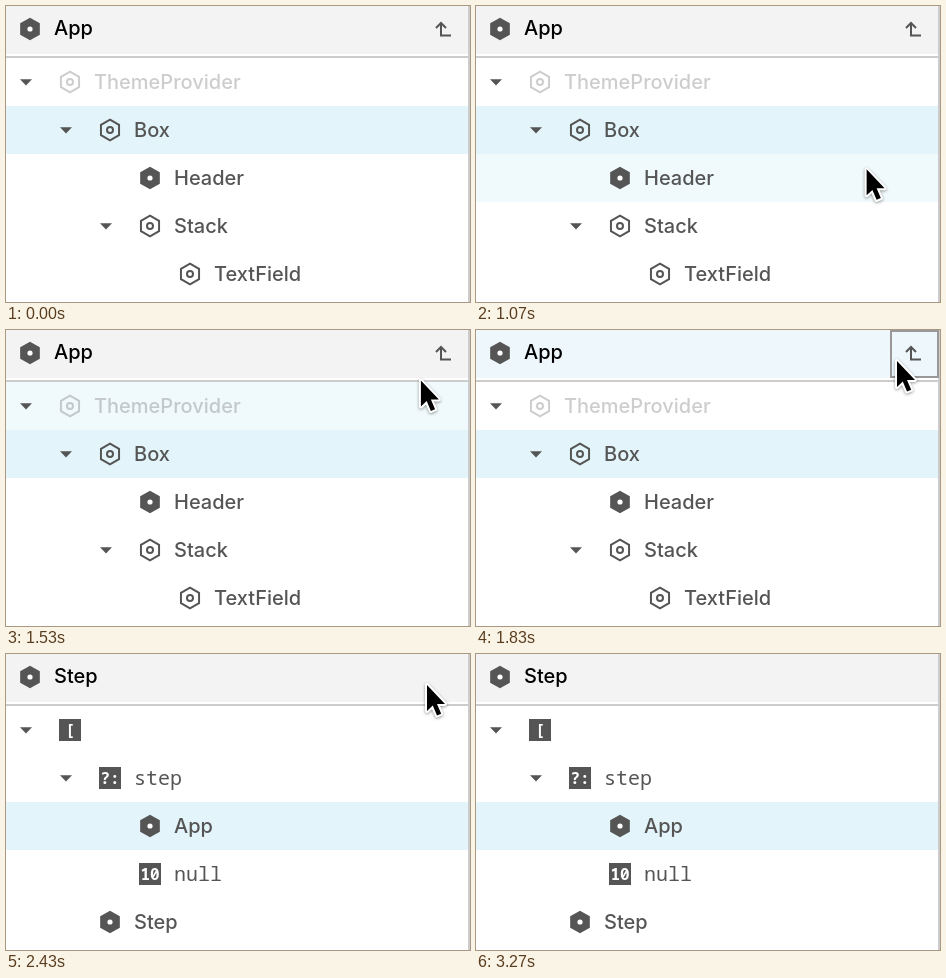
These frames come from a looping animation (464 px wide and 296 px high, 3900 ms). An HTML page:

```html
<!DOCTYPE html>
<html lang="en">
<head>
<meta charset="utf-8">
<title>Component tree</title>
<style>
  html, body { margin: 0; width: 100%; height: 100%; overflow: hidden; background: #fff; }
  svg { display: block; width: 464px; height: 296px; }
  text { font: 450 20px Inter, sans-serif; fill: #555; }
  .mono { font: 20px "Noto Sans Mono", monospace; }
  .badge { font: 600 16px "Noto Sans Mono", monospace; fill: #fff; text-anchor: middle; }
  .title { font-weight: 500; fill: #000; }
  .faded { opacity: .29; }
  .line { fill: none; stroke: #555; stroke-width: 2; }
</style>
</head>
<body>
<svg viewBox="0 0 464 296">
  <rect id="header" width="464" height="48"/>
  <rect y="50" width="464" height="2" fill="#ccc"/>
  <rect id="hover" width="464" height="48" fill="#f0f9fc"/>
  <rect id="selected" width="464" height="48" fill="#e3f5fb"/>
  <rect x="462" width="2" height="296" fill="#ccc"/>
  <g id="before">
    <rect id="button" x="415" y="1" width="47" height="46" fill="none" stroke="#999" stroke-width="2"/>
    <path class="line" d="M430 22l5-5 5 5M435 17v12.5h10"/>
  </g>
  <g id="after"></g>
  <path id="cursor" d="M0 0V26L5.8 20.6 10 30.5 14.2 28.7 10 19H18Z" stroke="#fff" stroke-width="4"
    stroke-linejoin="round" paint-order="stroke" style="filter: drop-shadow(0 1.5px 1.5px #0006)"/>
</svg>
<script>
const LOOP = 3900, ENTER = 770, REST = 1800, SWITCH = 2430, LEAVE = 2930, GONE = 3270;
const HOVER_LAG = 60, ROW = 48, TOP = 52;
const $ = id => document.getElementById(id);
const show = (id, on) => $(id).setAttribute('visibility', on ? 'visible' : 'hidden');

const hexagon = r => `M0 ${-r}L${r * .87} ${-r / 2}V${r / 2}L0 ${r}L${-r * .87} ${r / 2}V${-r / 2}Z`;
const solid = `<path d="${hexagon(11.3)}" fill="#555"/><circle r="2.6" fill="#fff"/>`;
const outline = `<path class="line" d="${hexagon(10.4)}"/><circle class="line" r="3"/>`;
const badge = s => `<rect x="-11" y="-11" width="22" height="22" fill="#555"/><text class="badge" y="5.5">${s}</text>`;
const at = (x, y, body) => `<g transform="translate(${x} ${y})">${body}</g>`;

const title = name => at(24, 23, solid) + `<text class="title" x="48" y="29">${name}</text>`;

function row(index, depth, icon, label, { caret, style = '' } = {}) {
  const y = TOP + ROW * (index + .5);
  return at(40 * depth, y,
    (caret ? '<path d="M14 -2.7H26L20 3.5Z" fill="#555"/>' : '') +
    `<g class="${style}">${at(64, 0, icon)}<text class="${style}-label ${style === 'mono' ? 'mono' : ''}" x="88" y="7">${label}</text></g>`);
}

$('before').innerHTML += title('App') +
  row(0, 0, outline, 'ThemeProvider', { caret: true, style: 'faded' }) +
  row(1, 1, outline, 'Box', { caret: true }) +
  row(2, 2, solid, 'Header') +
  row(3, 2, outline, 'Stack', { caret: true }) +
  row(4, 3, outline, 'TextField');

$('after').innerHTML = title('Step') +
  row(0, 0, badge('['), '', { caret: true }) +
  row(1, 1, badge('?:'), 'step', { caret: true, style: 'mono' }) +
  row(2, 2, solid, 'App') +
  row(3, 2, badge('10'), 'null', { style: 'mono' }) +
  row(4, 1, solid, 'Step');

const clamp = u => Math.min(1, Math.max(0, u));

function pointer(t) {
  const left = 1 - clamp((t - ENTER) / (REST - ENTER));
  const exit = clamp((t - LEAVE) / (GONE - LEAVE));
  return {
    x: 421 - 53 * left ** 1.61,
    y: 31 + 257 * left ** 1.92 - 72 * exit ** 1.7
  };
}

function draw(t) {
  const switched = t >= SWITCH;
  const { x, y } = pointer(t);
  show('cursor', t >= ENTER && t < GONE);
  $('cursor').setAttribute('transform', `translate(${x} ${y})`);

  // Highlighting trails the pointer slightly; it enters from the row below the view.
  const seenY = t - HOVER_LAG < ENTER ? 300 : pointer(t - HOVER_LAG).y;
  const onHeader = !switched && seenY < 50;
  $('header').setAttribute('fill', onHeader ? '#eef8fc' : '#f3f3f3');
  show('button', onHeader);
  show('hover', t >= ENTER && !switched && !onHeader);
  $('hover').setAttribute('y', TOP + ROW * Math.floor((seenY - TOP) / ROW));
  $('selected').setAttribute('y', TOP + ROW * (switched ? 2 : 1));
  show('before', !switched);
  show('after', switched);
}

function tick() {
  draw(performance.now() % LOOP);
  requestAnimationFrame(tick);
}
tick();
</script>
</body>
</html>
```
